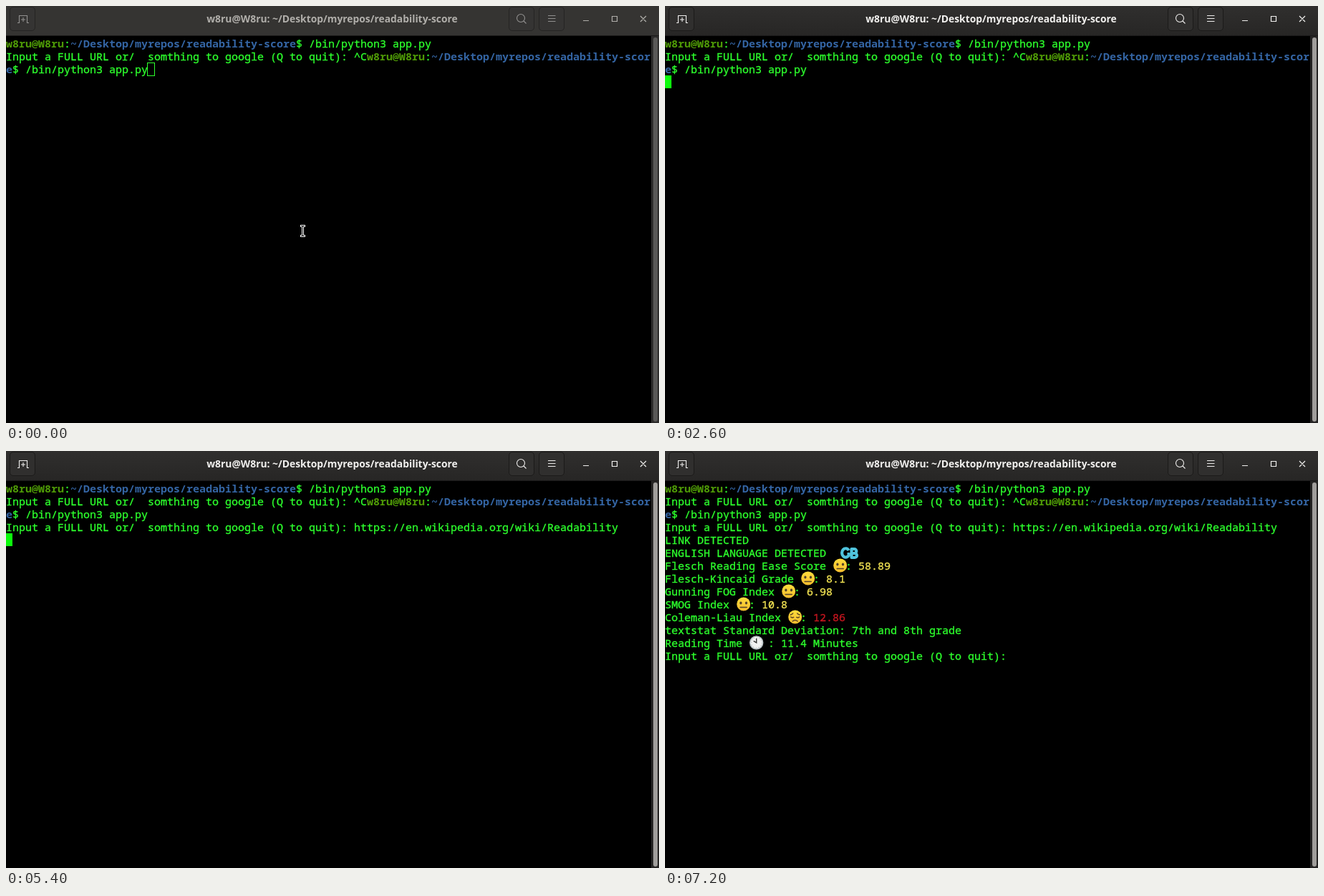
Animation, 912 px wide and 583 px high, one loop 8 s. Source, as an HTML page:

```html
<!DOCTYPE html>
<html lang="en">
<head>
<meta charset="utf-8">
<title>Terminal</title>
<style>
html, body { margin: 0; width: 100%; height: 100%; overflow: hidden; background: #000; }
svg { display: block; width: 912px; height: 583px; }
text { white-space: pre; }
.term { font: 15px "Noto Sans Mono", "DejaVu Sans Mono", monospace; }
.plain { stroke-width: .35px; }
.bold { font-weight: 600; }
#title { font-family: "Noto Sans", "Open Sans", sans-serif; font-weight: bold; font-size: 14px; }
</style>
</head>
<body>
<svg id="stage" viewBox="0 0 912 583" xmlns="http://www.w3.org/2000/svg">
  <defs>
    <linearGradient id="bar" x2="0" y2="1">
      <stop stop-color="#302f2e"/><stop offset="1" stop-color="#272625"/>
    </linearGradient>
    <linearGradient id="face" x2="0" y2="1">
      <stop stop-color="#fddc3c"/><stop offset="1" stop-color="#f6bd2e"/>
    </linearGradient>
  </defs>
  <rect width="912" height="583"/>
  <rect id="header" width="912" height="41"/>
  <rect y="41" width="912" height="1" fill="#1b1a1a"/>
  <g id="buttons"></g>
  <g id="icons" fill="none" stroke-width="1.1">
    <path d="M16 23.5H18.5V13.5H29.5V23.5H32M24 16V22M21 19H27"/>
    <circle cx="719" cy="17" r="5.5"/><path d="M723 21L726.5 24.5"/>
    <path d="M757 13.5H767.5M757 17.5H767.5M757 21.5H767.5"/>
  </g>
  <path id="controls" fill="none" stroke-width="1.2" d="M806 20.5H814M846.5 14.5H853.5V21.5H846.5ZM886 14L894 22M894 14L886 22"/>
  <text id="title" x="455.5" y="23" text-anchor="middle"></text>
  <rect id="trough" x="901" y="42" width="11" height="541"/>
  <rect id="thumb" x="904" y="44" width="6" height="537" rx="3"/>
  <g id="screen" class="term"></g>
  <rect id="cursor"/>
  <g id="pointer" fill="none">
    <path d="M411 307.5H418M411 321.5H418M414.5 307V322" stroke="#fff" stroke-width="3"/>
    <path d="M412 307.5H417M412 321.5H417M414.5 307V322" stroke="#000"/>
  </g>
</svg>
<script>
const LOOP = 8000, CELL = 9, ROW = 18, TOP = 43;
const GREEN = '#2dff2d', USER = '#4e9a06', PATH = '#3465a4', YELLOW = '#f5e654', RED = '#c4161f';
const $ = id => document.getElementById(id);

function add(parent, tag, attrs, text) {
  const el = document.createElementNS('http://www.w3.org/2000/svg', tag);
  for (const k in attrs) el.setAttribute(k, attrs[k]);
  if (text !== undefined) el.textContent = text;
  parent.appendChild(el);
  return el;
}
const set = (id, attrs) => { for (const k in attrs) $(id).setAttribute(k, attrs[k]); };

// Output appears group by group; each group has a start time.
const groups = [];
function group(start) {
  const el = add($('screen'), 'g', {});
  groups.push({ el, start });
  return el;
}
function put(g, row, col, text, fill = GREEN, bold = false) {
  add(g, 'text', {
    x: col * CELL, y: TOP + row * ROW + 15, fill,
    stroke: bold ? 'none' : fill, class: bold ? 'bold' : 'plain'
  }, text);
}

const who = 'w8ru@W8ru', dir = '~/Desktop/myrepos/readability-score';
const ask = 'Input a FULL URL or/  somthing to google (Q to quit): ';
const run = '$ /bin/python3 app.py';

function prompt(g, row, col, path) {
  put(g, row, col, who, USER, true);
  put(g, row, col + 9, ':');
  put(g, row, col + 10, path, PATH, true);
}

function face(g, cx, cy, sad) {
  const f = add(g, 'g', { transform: `translate(${cx} ${cy})`, fill: 'none', 'stroke-linecap': 'round' });
  add(f, 'circle', { r: 9.5, fill: 'url(#face)' });
  if (sad) {
    add(f, 'path', { d: 'M-6.5 -3Q-4.5 -3.2 -3 -5M6.5 -3Q4.5 -3.2 3 -5M-6 0Q-4 1.8 -2 .4M6 0Q4 1.8 2 .4M-3.5 6Q0 2.8 3.5 6', stroke: '#5c4425', 'stroke-width': 1.4 });
  } else {
    for (const x of [-3.8, 3.8]) add(f, 'ellipse', { cx: x, cy: -1.6, rx: 1.6, ry: 2, fill: '#52402a' });
    add(f, 'path', { d: 'M-4.5 4.5H4.5', stroke: '#52402a', 'stroke-width': 1.5 });
  }
}

function clock(g, cx, cy) {
  const c = add(g, 'g', { transform: `translate(${cx} ${cy})`, fill: 'none' });
  add(c, 'circle', { r: 9, fill: '#f1f1f1', stroke: '#b5bec2', 'stroke-width': 1.5 });
  add(c, 'circle', { r: 7, stroke: '#8b9397', 'stroke-width': 1, 'stroke-dasharray': `.7 ${7 * Math.PI / 6 - .7}` });
  add(c, 'path', { d: 'M0 -6V0L-4 -2.4', stroke: '#333', 'stroke-width': 1.4 });
}

// Fat rounded letters G and B.
function flag(g) {
  add(g, 'path', {
    d: 'M256.6 139A5.2 6.2 0 1 0 256.8 145.5V144H254.5M260.5 137H264.3a3 3 0 0 1 0 6H260.5H265a3 3 0 0 1 0 6H260.5Z',
    fill: 'none', stroke: '#4fc3dc', 'stroke-width': 4.2, 'stroke-linejoin': 'round'
  });
}

function score(g, row, label, value, fill, sad) {
  const col = label.length + 1;
  put(g, row, 0, label);
  put(g, row, col + 2, ':');
  put(g, row, col + 4, value, fill);
  face(g, col * CELL + 10.7, TOP + row * ROW + 9, sad);
}

function build() {
  for (const x of [5.5, 702.5, 744.5])
    add($('buttons'), 'rect', { x, y: 1.5, width: 35, height: 33, rx: 4.5 });

  let g = group(0);
  prompt(g, 0, 0, dir);
  put(g, 0, 45, run);
  put(g, 1, 0, ask + '^C');
  prompt(g, 1, 56, dir.slice(0, -1));
  put(g, 2, 0, 'e', PATH, true);
  put(g, 2, 1, run);

  put(group(3200), 3, 0, ask);
  put(group(4700), 3, 54, 'https://en.wikipedia.org/wiki/Readability');
  put(group(6000), 4, 0, 'LINK DETECTED');

  g = group(6200);
  put(g, 5, 0, 'ENGLISH LANGUAGE DETECTED');
  flag(g);

  g = group(6400);
  score(g, 6, 'Flesch Reading Ease Score', '58.89', YELLOW);
  score(g, 7, 'Flesch-Kincaid Grade', '8.1', YELLOW);
  score(g, 8, 'Gunning FOG Index', '6.98', YELLOW);
  score(g, 9, 'SMOG Index', '10.8', YELLOW);
  score(g, 10, 'Coleman-Liau Index', '12.86', RED, true);
  put(g, 11, 0, 'textstat Standard Deviation: 7th and 8th grade');
  put(g, 12, 0, 'Reading Time');
  clock(g, 127.7, 268);
  put(g, 12, 16, ': 11.4 Minutes');
  put(g, 13, 0, ask);

  // Pick the font size at which the title has its natural width.
  const title = $('title');
  title.textContent = who + ': ' + dir;
  title.style.fontSize = 14 * 351 / title.getComputedTextLength() + 'px';
}

// Cursor states: start, row, column; no row means hidden.
const blinks = [
  [1300, 2, 22], [2000], [2500, 2, 22], [2600, 3, 0], [3200], [3800, 3, 54],
  [4700, 3, 95], [4800], [5400, 4, 0], [6000], [6600, 13, 54], [7200]
];

function drawCursor(t) {
  if (t < 1300) {
    set('cursor', { x: 197.5, y: 79.5, width: 10, height: 18, fill: 'none', stroke: GREEN, visibility: 'visible' });
    return;
  }
  const [, row, col] = blinks.filter(b => b[0] <= t).pop();
  if (row === undefined) return set('cursor', { visibility: 'hidden' });
  set('cursor', { x: col * CELL, y: TOP + row * ROW, width: CELL, height: ROW, fill: '#0cfb0c', stroke: 'none', visibility: 'visible' });
}

const grey = (a, b, k) => { const v = Math.round(a + (b - a) * k); return `rgb(${v},${v - 1},${v - 2})`; };

function draw(t) {
  const on = t >= 1300;
  // Buttons gain focus in four steps, the rest of the window at once.
  const step = on ? Math.min(3, Math.floor((t - 1300) / 100)) : -1;
  const k = [0, .25, .65, .9, 1][step + 1];
  set('header', { fill: on ? 'url(#bar)' : '#353432' });
  set('buttons', { fill: grey(53, 48, k), stroke: on ? grey(40, 27, k) : '#252423' });
  set('icons', { stroke: grey(146, 240, k) });
  set('controls', { stroke: on ? '#f1f0ee' : '#b0aeaa' });
  set('title', { fill: on ? '#f1f0ee' : '#b0aeaa' });
  set('trough', { fill: on ? '#252423' : '#2d2c2b' });
  set('thumb', { fill: on ? '#a09e9b' : '#5a5957' });
  set('pointer', { visibility: t < 2500 ? 'visible' : 'hidden' });
  for (const { el, start } of groups) el.setAttribute('visibility', t >= start ? 'visible' : 'hidden');
  drawCursor(t);
}

build();
draw(0);
const began = performance.now();
function tick() {
  draw((performance.now() - began) % LOOP);
  requestAnimationFrame(tick);
}
requestAnimationFrame(tick);
</script>
</body>
</html>
```
